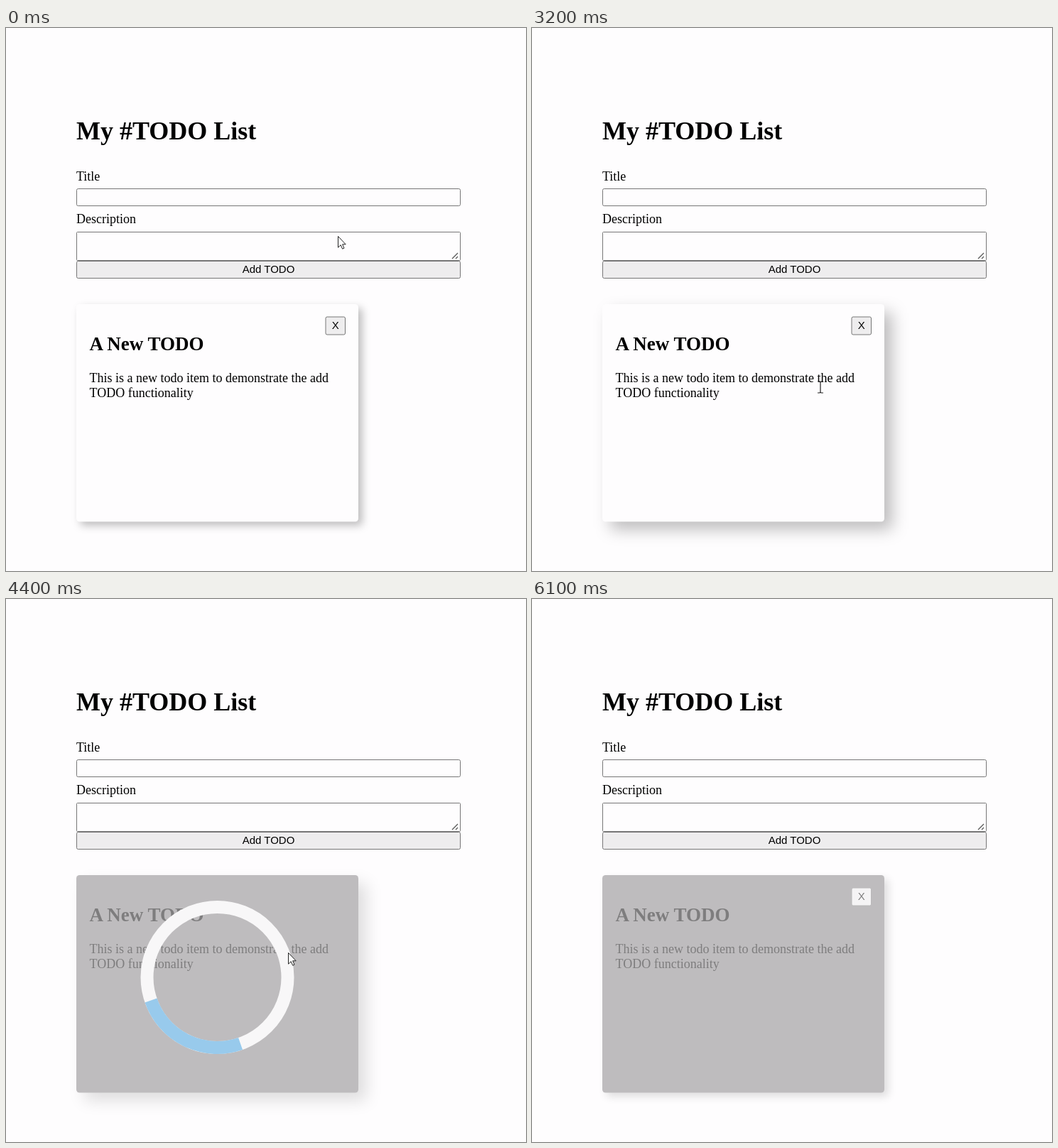
These frames come from a looping animation (732 px wide and 765 px high, 7300 ms). An HTML page:

```html
<!DOCTYPE html>
<html lang="en">
<head>
<meta charset="utf-8">
<title>My #TODO List</title>
<style>
  html, body { margin: 0; width: 100%; height: 100%; overflow: hidden; background: #fefdfe; }
  svg { display: block; }
  text { font: 18px "Liberation Serif", "Times New Roman", serif; }
  .h1 { font-size: 36px; font-weight: bold; }
  .h2 { font-size: 27px; font-weight: bold; }
  .label { font: 15px "Liberation Sans", Arial, sans-serif; text-anchor: middle; }
  .field { fill: #fefdfe; stroke: #767676; }
  .button { fill: #eeedee; stroke: #767676; }
  .ring { fill: none; stroke: #f3f3f3; stroke-width: 18; }
</style>
</head>
<body>
<svg width="732" height="765" viewBox="0 0 732 765">
  <text class="h1" x="99" y="157">My #TODO List</text>
  <text x="99" y="215">Title</text>
  <rect class="field" x="99.5" y="226.5" width="540" height="24" rx="2"/>
  <text x="99" y="275">Description</text>
  <rect class="field" x="99.5" y="287.5" width="540" height="40" rx="1"/>
  <path d="M628 325l8-8M633 325l3-3" stroke="#555" stroke-width="1.2"/>
  <rect class="button" x="99.5" y="328.5" width="540" height="24" rx="2"/>
  <text class="label" x="369.5" y="345">Add TODO</text>

  <g id="card">
    <rect id="shadow" x="99" y="389" width="397" height="306.5" rx="4.5" fill-opacity=".25"/>
    <rect id="face" x="99" y="389" width="397" height="306.5" rx="4.5"/>
    <text class="h2" x="117.5" y="454">A New TODO</text>
    <text x="117.5" y="499">This is a new todo item to demonstrate the add</text>
    <text x="117.5" y="520">TODO functionality</text>
    <g id="close">
      <rect class="button" x="450" y="407" width="27.5" height="25" rx="2"/>
      <text class="label" x="463.7" y="424">X</text>
    </g>
    <g id="spinner">
      <circle class="ring" cx="297.5" cy="533" r="99"/>
      <path class="ring" d="M-70 -70A99 99 0 0 1 70 -70" id="arc" style="stroke:#3498db"/>
    </g>
  </g>

  <path id="arrow" d="M.5.5V16.2L4.2 12.7 6.6 18.2 9 17.1 6.6 11.8H11.2Z" fill="#fff" stroke="#222"/>
  <path id="beam" d="M-4 -8H-1L0 -7 1 -8H4M0 -7V7M-4 8H-1L0 7 1 8H4" fill="none" stroke="#222" stroke-width="1.2"/>
</svg>
<script>
  const LOOP = 7300, STEP = 100;
  const CLICK = 3300, LOADED = 5400, HOVER = 2800, LEAVE = 6000;

  // Each visit of the pointer: points of [time, x, y], hidden after the last one.
  const visits = [
    [[0, 467, 293], [100, 480, 312], [400, 545, 420], [600, 582, 490], [800, 583, 479], [900, 583, 479]],
    [[1700, 690, 495], [1800, 690, 495]],
    [[2700, 534, 508], [2800, 480, 507], [3000, 420, 506], [3200, 406, 506], [3300, 397, 498],
     [5900, 397, 498], [6000, 517, 486], [6100, 517, 486]]
  ];

  const $ = id => document.getElementById(id);
  const show = (id, on) => $(id).style.display = on ? "" : "none";
  const clamp = v => Math.min(1, Math.max(0, v));
  const mix = (a, b, k) => a + (b - a) * k;

  function pointerAt(t) {
    const path = visits.find(p => t >= p[0][0] && t < p[p.length - 1][0]);
    if (!path) return null;
    const i = path.findIndex(p => p[0] > t);
    const a = path[i - 1], b = path[i], k = (t - a[0]) / (b[0] - a[0]);
    return [mix(a[1], b[1], k), mix(a[2], b[2], k)];
  }

  function draw(t) {
    const done = t >= CLICK, loading = done && t < LOADED;
    $("card").style.opacity = done ? .5 : 1;
    $("face").style.fill = done ? "#807d80" : "#fefdfe";
    show("close", !loading);
    show("spinner", loading);
    $("arc").setAttribute("transform",
      `translate(297.5 533) rotate(${10 + (t - CLICK) * .178})`);

    const lift = t < LEAVE ? clamp((t - HOVER) / 300) : 1 - clamp((t - LEAVE) / 100);
    const offset = mix(5.6, 11.25, lift);
    $("shadow").style.transform = `translate(${offset}px, ${offset}px)`;
    $("shadow").style.filter = `blur(${offset}px)`;

    const pointer = pointerAt(t);
    const overText = t >= 3000 && t < CLICK;
    show("arrow", pointer && !overText);
    show("beam", pointer && overText);
    if (pointer)
      $(overText ? "beam" : "arrow").setAttribute("transform", `translate(${pointer})`);
  }

  const start = performance.now();
  function tick() {
    const t = (performance.now() - start) % LOOP;
    draw(Math.floor(t / STEP) * STEP);
    requestAnimationFrame(tick);
  }
  tick();
</script>
</body>
</html>
```
